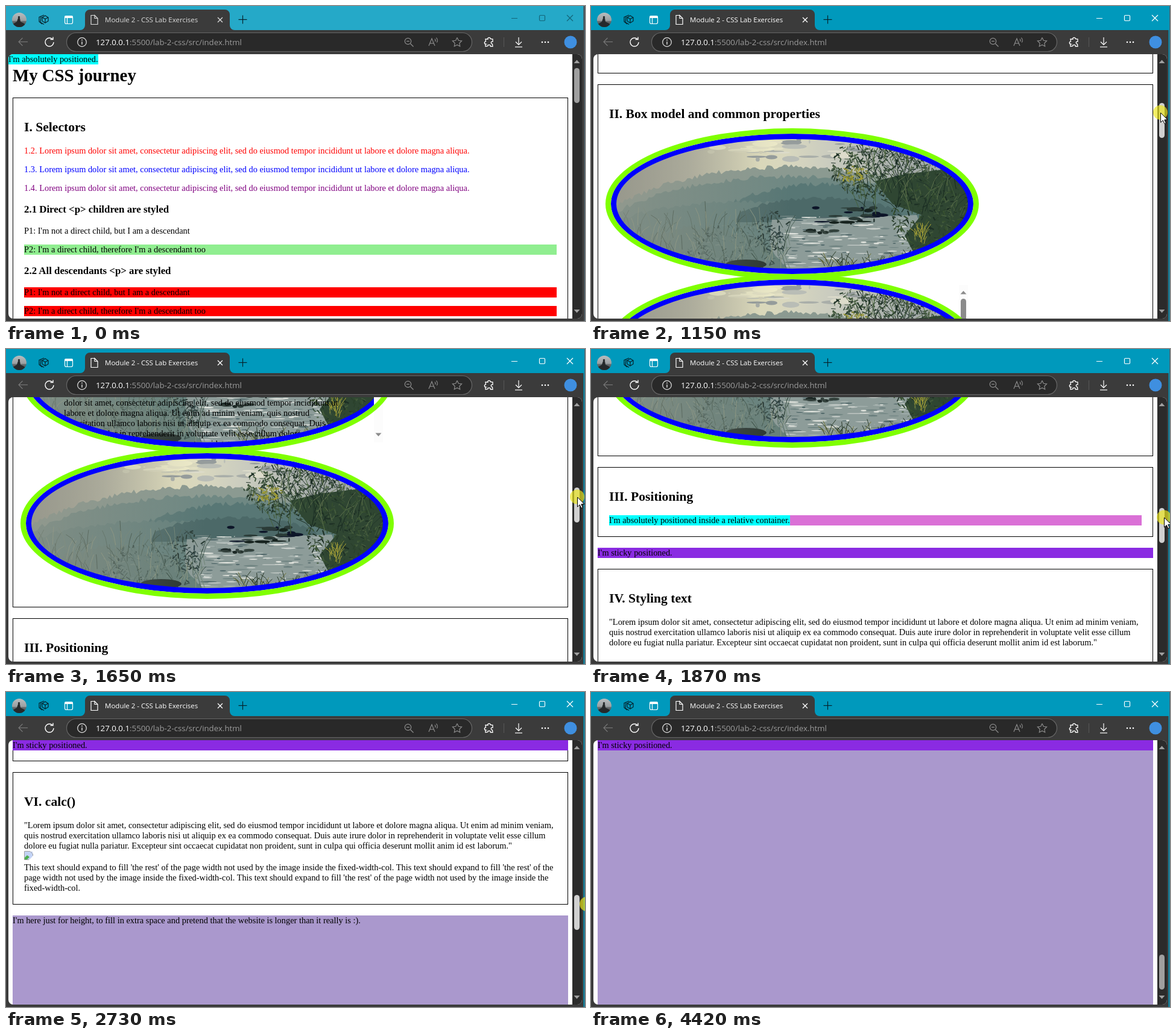
Recreate the animation shown at these times as an HTML page with a canvas. Size 960 by 523 pixels, loop 4540 ms.

```html
<!DOCTYPE html>
<html lang="en">
<head>
<meta charset="utf-8">
<title>Module 2 - CSS Lab Exercises</title>
<style>
html, body { margin: 0; width: 100%; height: 100%; overflow: hidden; background: #3b3b3b; }
canvas, span, i, #page, #doc, #clip { position: absolute; left: 0; top: 0; }
span { white-space: pre; }
.ui { font: 11.5px/20px "Open Sans", "Noto Sans", sans-serif; }
.url { font-size: 13.25px; color: #9b9b9b; }
.url b { font-weight: 400; color: #fff; }
#page { left: 4px; top: 80px; width: 951px; height: 439px; border-radius: 8px; overflow: hidden; background: #fff; }
#doc { left: -4px; top: -80px; width: 960px; height: 3200px; }
#doc span { font: 14.4px/17px "Liberation Serif", "Times New Roman", serif; color: #000; }
#doc .h1 { font-size: 28.8px; line-height: 32px; font-weight: 700; }
#doc .h2 { font-size: 21.6px; line-height: 24px; font-weight: 700; }
#doc .h3 { font-size: 16.85px; line-height: 19px; font-weight: 700; }
i.box { left: 11px; width: 921px; box-sizing: border-box; border: 1px solid #000; }
#clip { left: 42px; width: 583px; height: 215px; clip-path: ellipse(50% 50%); }
</style>
</head>
<body>
<canvas id="chrome" width="960" height="523"></canvas>
<span class="ui" id="tab" style="left:164px;top:13px">Module 2 - CSS Lab Exercises</span>
<span class="ui url" style="left:149px;top:50px"><b>127.0.0.1</b>:5500/lab-2-css/src/index.html</span>
<div id="page"><div id="doc"></div></div>
<canvas id="over" width="960" height="523"></canvas>
<script>
const LOOP = 4540, STEP = 60.75;
const $ = id => document.getElementById(id);
const doc = $('doc');

// ---------- page content ----------
function add(tag, css, parent = doc) {
  const e = document.createElement(tag);
  Object.assign(e.style, css);
  return parent.appendChild(e);
}
function text(x, y, str, cls = '', color = '', parent = doc) {
  const e = add('span', { left: x + 'px', top: y + 'px', color }, parent);
  e.className = cls;
  e.textContent = str;
  return e;
}
const lines = (x, y, list, parent) => list.forEach((s, n) => text(x, y + n * 17, s, '', '', parent));
const rect = (x, y, w, h, background) =>
  add('i', { left: x + 'px', top: y + 'px', width: w + 'px', height: h + 'px', background });
function section(top, bottom, title) {
  add('i', { top: top + 'px', height: bottom - top + 'px' }).className = 'box';
  text(30, top + 37, title, 'h2');
}
const lorem = [
  '"Lorem ipsum dolor sit amet, consectetur adipiscing elit, sed do eiusmod tempor incididunt ut labore et dolore magna aliqua. Ut enim ad minim veniam,',
  'quis nostrud exercitation ullamco laboris nisi ut aliquip ex ea commodo consequat. Duis aute irure dolor in reprehenderit in voluptate velit esse cillum',
  'dolore eu fugiat nulla pariatur. Excepteur sint occaecat cupidatat non proident, sunt in culpa qui officia deserunt mollit anim id est laborum."'
];
const child = ["P1: I'm not a direct child, but I am a descendant", "P2: I'm a direct child, therefore I'm a descendant too"];

text(11, 99, 'My CSS journey', 'h1');
rect(4, 80, 149, 17, '#0ff');
text(4, 80, "I'm absolutely positioned.");

section(152, 549, 'I. Selectors');
['red', 'blue', 'purple'].forEach((color, n) => text(30, Math.round(231.6 + n * 31.4),
  `1.${n + 2}. Lorem ipsum dolor sit amet, consectetur adipiscing elit, sed do eiusmod tempor incididunt ut labore et dolore magna aliqua.`, '', color));
text(30, 328, '2.1 Direct <p> children are styled', 'h3');
rect(30, 396, 883, 17, 'lightgreen');
text(30, 365, child[0]);
text(30, 396, child[1]);
text(30, 430, '2.2 All descendants <p> are styled', 'h3');
child.forEach((s, n) => {
  rect(30, 467 + n * 31, 883, 17, 'red');
  text(30, 467 + n * 31, s);
});

section(567, 1389, 'II. Box model and common properties');
const ovalTop = 649;
for (let n = 0; n < 3; n++) {
  const c = add('canvas', { left: '24px', top: ovalTop - 9 + n * 242 + 'px' });
  c.width = 619;
  c.height = 251;
  oval(c.getContext('2d'), n === 1);
}
const clip = add('div', { top: ovalTop + 251 + 'px' });
clip.id = 'clip';
lines(54, 90, [
  "I'm second and I have a lot of content. In publishing and graphic design, Lorem",
  'ipsum is a placeholder text commonly used to demonstrate the visual form of a',
  'document or a typeface without relying on meaningful content. "Lorem ipsum',
  'dolor sit amet, consectetur adipiscing elit, sed do eiusmod tempor incididunt ut',
  'labore et dolore magna aliqua. Ut enim ad minim veniam, quis nostrud',
  'exercitation ullamco laboris nisi ut aliquip ex ea commodo consequat. Duis',
  'aute irure dolor in reprehenderit in voluptate velit esse cillum dolore eu fugiat',
  'nulla pariatur. Excepteur sint occaecat cupidatat non proident, sunt'
], clip);

section(1407, 1523, 'III. Positioning');
rect(30, 1487, 883, 17, 'orchid');
rect(30, 1487, 300, 17, '#0ff');
text(30, 1487, "I'm absolutely positioned inside a relative container.");

section(1576, 1741, 'IV. Styling text');
lines(30, 1656, lorem);
section(1759, 1879, 'V.');
section(1897, 2117, 'VI. calc()');
lines(30, 1977, lorem);
const fill = "This text should expand to fill 'the rest' of the";
lines(30, 2047, [
  fill + ' page width not used by the image inside the fixed-width-col. ' + fill,
  'page width not used by the image inside the fixed-width-col. ' + fill + ' page width not used by the image inside the',
  'fixed-width-col.'
]);
broken(30, 2028);
rect(11, 2135, 921, 1000, '#aa98cd');
text(11, 2135, "I'm here just for height, to fill in extra space and pretend that the website is longer than it really is :).");
const sticky = rect(11, 0, 921, 17, 'blueviolet');
text(0, 0, "I'm sticky positioned.", '', '', sticky);

function broken(x, y) {
  const cv = add('canvas', { left: x + 'px', top: y + 'px' });
  cv.width = cv.height = 16;
  const c = cv.getContext('2d');
  c.fillStyle = '#c3d3f5';
  c.fillRect(1, 1, 13, 13);
  poly(c, [1, 14, 1, 11, 5, 7, 9, 10, 5, 14], '#4caf50');
  poly(c, [8, 15, 15, 8, 15, 15], '#fff');
  stroke(c, [8, 14.5, 0.5, 14.5, 0.5, 0.5, 10, 0.5, 14.5, 5, 14.5, 8], '#a0a0a0', 1);
}

// ---------- drawing helpers ----------
function trace(c, p) {
  c.beginPath();
  for (let n = 0; n < p.length; n += 2) c.lineTo(p[n], p[n + 1]);
}
function poly(c, p, color) {
  trace(c, p);
  c.closePath();
  c.fillStyle = color;
  c.fill();
}
function stroke(c, p, color, w = 1.2) {
  trace(c, p);
  c.strokeStyle = color;
  c.lineWidth = w;
  c.stroke();
}
function disc(c, x, y, rx, ry, color) {
  c.beginPath();
  c.ellipse(x, y, rx, ry, 0, 0, 7);
  c.fillStyle = color;
  c.fill();
}
function ring(c, x, y, r, color, w = 1.2, a = 0, b = 2 * Math.PI) {
  c.beginPath();
  c.arc(x, y, r, a, b);
  c.strokeStyle = color;
  c.lineWidth = w;
  c.stroke();
}
function round(c, x, y, w, h, r, color, line) {
  c.beginPath();
  c.roundRect(x, y, w, h, r);
  if (color) { c.fillStyle = color; c.fill(); }
  if (line) { c.strokeStyle = line; c.lineWidth = 1.2; c.stroke(); }
}
function arrow(c, x, y, d, color) {
  poly(c, [x - 5, y + 2.5 * d, x, y - 3 * d, x + 5, y + 2.5 * d], color);
}
function random(seed) {
  return () => (seed = seed * 16807 % 2147483647) / 2147483647;
}

// ---------- lake view in an oval frame ----------
function oval(c, bar) {
  const rnd = random(77), cx = 333.5, cy = 299.5;
  const spread = (a, b) => a + rnd() * (b - a);
  // a jagged band that narrows towards both ends
  const band = (x0, x1, top, bottom, amp, color) => {
    const p = [x0, bottom];
    for (let x = x0; x <= x1; x += 4) {
      const u = Math.sin(Math.PI * (x - x0) / (x1 - x0)) ** 0.4;
      p.push(x, bottom + (top - bottom) * u + spread(-amp, amp));
    }
    poly(c, p.concat(x1, bottom), color);
  };
  const blobs = (n, x0, x1, y0, y1, rx, ry, colors) => {
    while (n--) disc(c, spread(x0, x1), spread(y0, y1), spread(1, rx), spread(0.6, ry), colors[n % colors.length]);
  };
  const blades = (n, x0, x1, y0, y1, len, lean, colors) => {
    while (n--) {
      const x = spread(x0, x1), y = spread(y0, y1), h = spread(0.3, 1) * len, d = spread(-lean, lean);
      stroke(c, [x, y, x + d * 0.4, y - h * 0.6, x + d, y - h], colors[n % colors.length], 1);
    }
  };
  // foliage: dense in the middle of its region, loose at the rim
  const leaves = (n, x, y, rx, ry, colors) => {
    while (n--) {
      const a = spread(0, 6.28), r = Math.sqrt(rnd()), s = spread(3, 9), t = spread(-0.9, 2.2);
      const u = x + rx * r * Math.cos(a), v = y + ry * r * Math.sin(a);
      stroke(c, [u, v, u + s * Math.cos(t), v + s * Math.sin(t)], colors[n % colors.length], spread(0.8, 2.4));
    }
  };
  c.translate(-24, -174);
  c.save();
  c.beginPath();
  c.ellipse(cx, cy, 296, 112, 0, 0, 7);
  c.clip();
  const sky = c.createLinearGradient(40, 0, 520, 0);
  ['#a09c90', '#b9b6a4', '#e2dfbf', '#c9cbbf', '#a3aaa8'].forEach((s, n) => sky.addColorStop(n / 4, s));
  c.fillStyle = sky;
  c.fillRect(30, 180, 610, 240);
  blobs(26, 270, 470, 192, 226, 26, 5, ['#959c9c', '#dddccb', '#a9aea9', '#b9bdb6']);
  blobs(14, 190, 320, 196, 222, 24, 6, ['#efecca', '#e6e3c6', '#d3d1b8']);
  band(-40, 700, 238, 420, 4, '#8b9a91');
  band(-40, 700, 254, 420, 4, '#6f8883');
  band(140, 640, 266, 420, 5, '#587775');
  band(-60, 560, 296, 420, 3, '#65817d');
  band(240, 520, 290, 330, 3, '#4c6968');
  // water
  poly(c, [300, 326, 540, 318, 580, 420, 320, 420, 296, 366], '#8d9c99');
  blobs(150, 325, 525, 320, 404, 15, 1.3, ['#c9cfcb', '#708482', '#dfe2dc', '#a3b0ad', '#51686a']);
  blobs(26, 372, 480, 306, 332, 14, 3.5, ['#17231f', '#2b3b37', '#0d1528']);
  blobs(12, 356, 412, 343, 348, 10, 3, ['#1d2926', '#33413c']);
  // left bank
  band(30, 330, 338, 440, 5, '#667f79');
  leaves(260, 240, 372, 85, 42, ['#4a625d', '#5c7671', '#374c47', '#728880']);
  leaves(70, 300, 345, 26, 34, ['#22332f', '#34494a', '#2b3d37']);
  blades(150, 45, 330, 330, 408, 40, 18, ['#8a9680', '#6f8476', '#4f665c', '#3a4f45']);
  disc(c, 257, 400, 34, 8, '#26322e');
  // right trees and bank
  leaves(620, 505, 238, 112, 56, ['#2c4230', '#3a5138', '#22342a', '#4a5f45']);
  poly(c, [470, 262, 520, 250, 640, 236, 640, 420, 556, 420, 520, 352, 548, 318, 500, 300], '#2f4632');
  leaves(420, 570, 320, 72, 74, ['#2a402b', '#37502f', '#1d2f24', '#435a3c']);
  blades(130, 440, 615, 220, 320, 44, 26, ['#22362a', '#45603c', '#182a20', '#5d6f4c']);
  leaves(46, 434, 249, 24, 12, ['#a39f35', '#7e8230']);
  blades(20, 536, 556, 346, 366, 28, 12, ['#b0a738', '#8a8e38']);
  blades(70, 380, 560, 396, 414, 24, 14, ['#2e3f2c', '#77793c', '#233324']);
  const haze = c.createLinearGradient(40, 0, 330, 0);
  haze.addColorStop(0, 'rgba(146,150,138,.6)');
  haze.addColorStop(1, 'rgba(146,150,138,0)');
  c.fillStyle = haze;
  c.fillRect(30, 180, 310, 240);
  c.restore();

  const border = (grow, color) => {
    c.beginPath();
    c.ellipse(cx, cy, 300.5 + grow, 116.5 + grow, 0, 0, 2 * Math.PI);
    c.closePath();
    c.ellipse(cx, cy, 291.5 + grow, 107.5 + grow, 0, 0, 2 * Math.PI);
    c.fillStyle = color;
    c.fill('evenodd');
  };
  border(0, '#00f');
  if (bar) {
    c.fillStyle = '#fcfcfc';
    c.fillRect(610, 192, 15, 215);
    round(c, 613, 215, 9, 109, 4.5, '#8b8b8b');
    arrow(c, 617.5, 205, 1, '#8b8b8b');
    arrow(c, 617.5, 394, -1, '#8b8b8b');
  }
  border(9, '#7fff00');
}

// ---------- browser frame ----------
function frame(c, active) {
  const accent = active ? '#0099bc' : '#25a9c8', gray = '#8c8c8c';
  const light = active ? '#fff' : '#dcdcdc', win = active ? '#fff' : '#14667a', ink = '#06222b';
  c.fillStyle = '#3b3b3b';
  c.fillRect(0, 0, 960, 523);
  c.fillStyle = accent;
  c.fillRect(0, 0, 958, 40);
  c.fillStyle = active ? accent : '#4a4a4a';
  c.fillRect(957.5, 0, 1.5, 523);
  c.fillStyle = '#47606e';
  c.fillRect(959, 0, 1, 523);

  // tab with flared feet
  c.beginPath();
  c.moveTo(123, 40);
  c.arcTo(131, 40, 131, 32, 8);
  c.arcTo(131, 6, 139, 6, 8);
  c.arcTo(371, 6, 371, 14, 8);
  c.arcTo(371, 40, 379, 40, 8);
  c.lineTo(379, 40);
  c.fillStyle = '#3b3b3b';
  c.fill();

  // avatar
  c.save();
  c.beginPath();
  c.arc(22, 23, 12, 0, 7);
  c.clip();
  const g = c.createLinearGradient(0, 11, 0, 35);
  g.addColorStop(0, '#b9bdbf');
  g.addColorStop(0.55, '#9a9fa1');
  g.addColorStop(0.6, '#6b7072');
  g.addColorStop(1, '#35393b');
  c.fillStyle = g;
  c.fillRect(10, 11, 24, 24);
  poly(c, [10, 31, 18, 26, 20, 20, 23, 20, 24, 26, 30, 29, 34, 35, 10, 35], '#25292b');
  disc(c, 21.5, 18.5, 1.7, 1.8, '#25292b');
  c.restore();

  // stacked cards
  stroke(c, [60, 19, 65, 16, 70, 19, 70, 25, 65, 28, 60, 25, 60, 19, 65, 21.5, 70, 19], ink);
  stroke(c, [65, 21.5, 65, 28], ink);
  stroke(c, [58, 18, 57, 27, 63, 30.5], ink);
  stroke(c, [63, 15, 55, 18.5, 55, 26, 60, 30], ink);
  // side tabs
  round(c, 97.5, 16.5, 13, 13, 2.5, null, '#fff');
  c.fillStyle = '#fff';
  c.fillRect(97.5, 16.5, 13, 3.5);
  stroke(c, [101.5, 18, 101.5, 29.5], '#fff');
  // page sign, close, plus
  stroke(c, [147, 15.5, 141, 15.5, 141, 30.5, 152, 30.5, 152, 20.5, 147, 15.5, 147, 20.5, 152, 20.5], light);
  stroke(c, [351, 19, 359, 27], light);
  stroke(c, [359, 19, 351, 27], light);
  stroke(c, [385.5, 22.5, 399.5, 22.5], ink);
  stroke(c, [392.5, 15.5, 392.5, 29.5], ink);
  // window buttons
  stroke(c, [838, 20.5, 848, 20.5], win, 1);
  round(c, 884.5, 15.5, 9, 9, 1.5, null, win);
  stroke(c, [930, 15, 940, 25], win);
  stroke(c, [940, 15, 930, 25], win);

  // toolbar
  stroke(c, [36, 59.5, 21, 59.5], '#767676');
  stroke(c, [27.5, 53, 21, 59.5, 27.5, 66], '#767676');
  ring(c, 72, 60, 7, '#fff', 1.4, 0, 5.5);
  stroke(c, [73.5, 55.5, 78, 55.5, 78, 51.5], '#fff', 1.4);
  round(c, 100.5, 44.5, 672, 31, 15.5, '#292929', '#666');
  ring(c, 126, 60, 7.3, '#e6e6e6');
  stroke(c, [126, 59, 126, 64], '#e6e6e6', 1.4);
  disc(c, 126, 56.5, 0.9, 0.9, '#e6e6e6');
  ring(c, 666.5, 58.5, 5.2, gray);
  stroke(c, [670.5, 62.5, 675.5, 67.5], gray, 1.3);
  stroke(c, [664, 58.5, 669, 58.5], gray);
  stroke(c, [701, 66, 706, 54, 711, 66], gray);
  stroke(c, [703, 62, 709, 62], gray);
  ring(c, 709, 57, 3, gray, 1.1, -0.9, 0.7);
  ring(c, 709, 57, 6.2, gray, 1.1, -0.8, 0.6);
  const star = [];
  for (let n = 0; n <= 10; n++) {
    const r = n % 2 ? 4 : 8, a = n * Math.PI / 5;
    star.push(748 + r * Math.sin(a), 60.5 - r * Math.cos(a));
  }
  stroke(c, star, gray);
  // puzzle piece
  c.beginPath();
  c.moveTo(795, 55);
  c.lineTo(799, 55);
  c.arc(801, 54.5, 2.2, Math.PI, 0);
  c.lineTo(807, 55);
  c.lineTo(807, 59);
  c.arc(806.5, 61, 2.2, -1.57, 1.57, true);
  c.lineTo(807, 67);
  c.lineTo(803.2, 67);
  c.arc(801, 66.5, 2.2, 0, Math.PI, true);
  c.lineTo(795, 67);
  c.lineTo(795, 63);
  c.arc(795.5, 61, 2.2, 1.57, -1.57);
  c.closePath();
  c.strokeStyle = '#fff';
  c.lineWidth = 1.3;
  c.stroke();
  stroke(c, [825.5, 52, 825.5, 68], '#575757', 1);
  stroke(c, [850, 52, 850, 64], '#fff');
  stroke(c, [845, 59.5, 850, 64.5, 855, 59.5], '#fff');
  stroke(c, [844, 68, 856, 68], '#fff');
  [889, 894, 899].forEach(x => disc(c, x, 60, 1.3, 1.3, '#fff'));
  disc(c, 936, 60, 10.5, 10.5, '#3f8fe0');
}

// ---------- motion: [step, value] keys ----------
const scrollKeys = [[-3, 0], [-1, 98], [8, 708], [16, 1211], [30, 1764], [43, 2240], [44, 2240], [53, 2481], [55, 2511]];
const mouseX = [[-8, 975], [-3, 944], [8, 944], [16, 950], [30, 963], [43, 968], [53, 966], [57, 990]];
const mouseDy = [[-8, 60], [-3, 16], [30, 15], [43, 13]];

function at(keys, k) {
  if (k <= keys[0][0]) return keys[0][1];
  for (let n = 1; n < keys.length; n++) {
    const [a, u] = keys[n - 1], [b, v] = keys[n];
    if (k <= b) return u + (v - u) * (k - a) / (b - a);
  }
  return keys[keys.length - 1][1];
}

const base = $('chrome').getContext('2d'), over = $('over').getContext('2d');
let last;

function draw(k) {
  const active = k >= -9, held = k >= -3 && k < 58;
  const scroll = Math.round(at(scrollKeys, k)), thumb = Math.round(103 + scroll / 7.54);
  frame(base, active);
  $('tab').style.color = active ? '#fff' : '#dcdcdc';
  doc.style.transform = `translateY(${-scroll}px)`;
  sticky.style.top = Math.max(1541, scroll + 80) + 'px';

  const c = over;
  c.clearRect(0, 0, 960, 523);
  round(c, 939, 80, 16, 439, [0, 8, 8, 0], '#2b2b2b');
  arrow(c, 946.5, 92.5, 1, '#9f9f9f');
  arrow(c, 946.5, 506.5, -1, '#9f9f9f');
  round(c, 942, thumb, 9, 58, 4.5, held ? '#d0d0d0' : '#9f9f9f');
  if (k < -8 || k >= 58) return;
  const x = at(mouseX, k), y = thumb + at(mouseDy, k);
  disc(c, x, y, 12, 12, 'rgba(236,230,28,.68)');
  c.save();
  c.translate(x + 0.5, y + 0.5);
  const hand = [0, 0, 0, 16, 3.8, 12.6, 6.4, 18.2, 8.8, 17.2, 6.3, 11.7, 11.4, 11.4, 0, 0];
  poly(c, hand, '#fff');
  stroke(c, hand, '#000', 1);
  c.restore();
}

function tick() {
  const t = performance.now() % LOOP;
  const k = Math.floor((t - 894) / STEP);
  if (k !== last) draw(last = k);
  requestAnimationFrame(tick);
}
tick();
</script>
</body>
</html>
```
